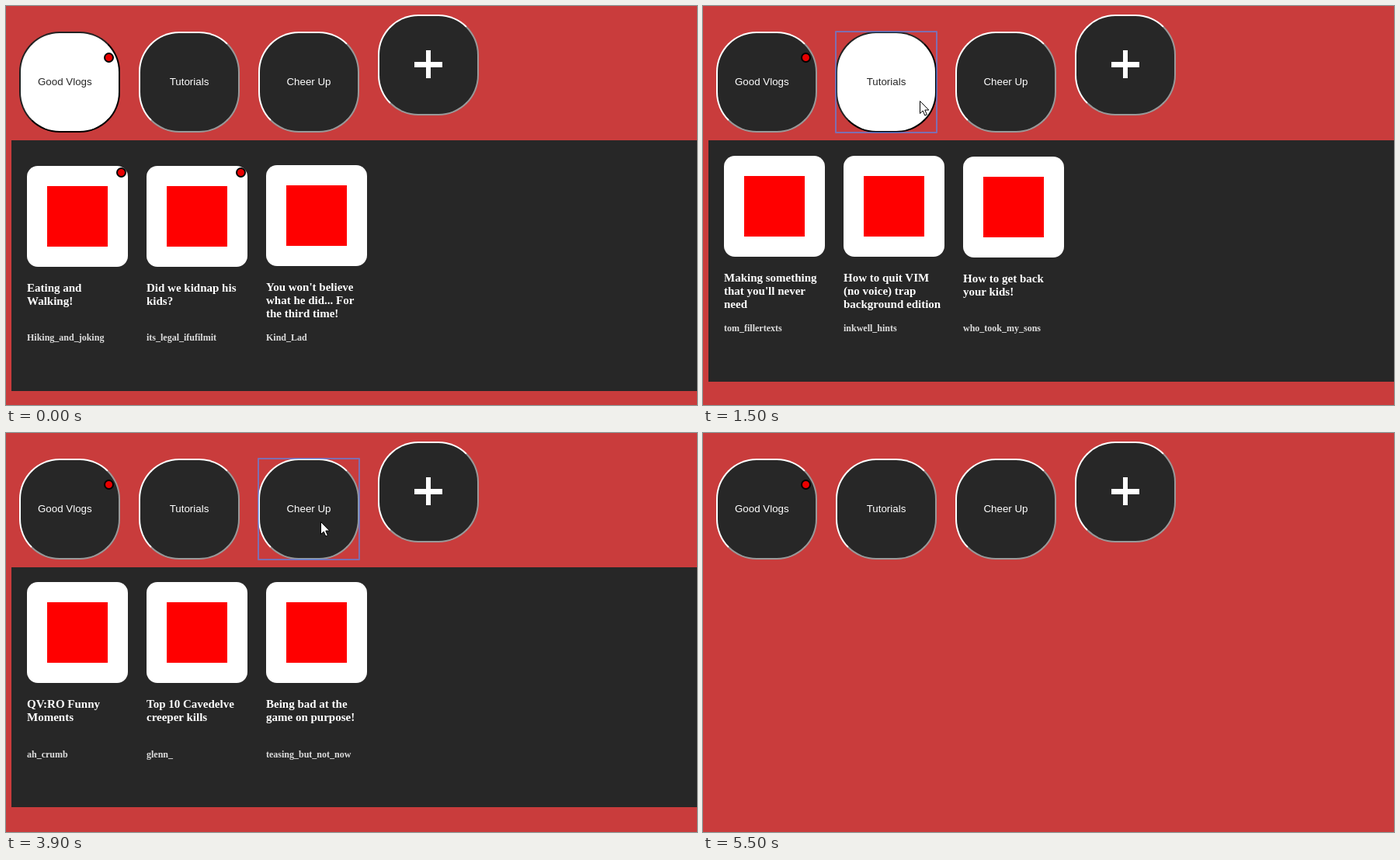
An HTML page that plays this animation: 890 px wide and 514 px high, repeating every 5600 ms.

```html
<!DOCTYPE html>
<html lang="en">
<head>
<meta charset="utf-8">
<title>Subscription groups</title>
<style>
  html, body { margin: 0; width: 100%; height: 100%; overflow: hidden; background: #c93c3c; }
  body * { position: absolute; box-sizing: border-box; }
  .group {
    width: 130px; height: 130px; border: 2px solid; border-radius: 52px;
    border-color: #fff #999 #999 #fff; background: #272727; color: #fff;
    font: 13.333px/15px "Liberation Sans", Arial, sans-serif;
  }
  .group.on { background: #fff; color: #272727; border-color: #222 #000 #000 #222; }
  .group span { left: 0; width: 126px; top: 55px; text-align: center; }
  .group:first-child span { left: 22px; text-align: left; }
  .bar { background: #fff; }
  .dot { width: 13px; height: 13px; border: 2px solid #000; border-radius: 50%; background: #e80000; }
  #ring { top: 32px; width: 132px; height: 132px; border: 2px solid rgba(77, 144, 254, .6); border-radius: 1px; }
  .panel { left: 7px; top: 173px; right: 0; overflow: hidden; background: #272727; }
  .list { left: 0; top: 0; }
  .thumb { width: 130px; height: 130px; border-radius: 14px; background: #fff; }
  .mark { left: 26px; top: 26px; width: 78px; height: 78px; background: #f00; }
  .title, .author { white-space: pre; font: bold 15px/17px "Liberation Serif", "Times New Roman", serif; color: #fff; }
  .author { font-size: 12px; line-height: 14px; color: #ddd; }
  #cursor { left: 0; top: 0; overflow: visible; }
</style>
</head>
<body>
<div id="groups"></div>
<div id="panels"></div>
<div id="ring"></div>
<svg id="cursor" width="13" height="20">
  <path d="M.5 .5V16.5L4.2 13L6.8 19L9.4 17.9L6.8 12H11.8Z" fill="#fff" stroke="#000"/>
</svg>
<script>
const LOOP = 5600, STEP = 100;
const $ = id => document.getElementById(id);

function add(parent, cls, x, y, text = "") {
  const el = document.createElement("div");
  el.className = cls;
  if (x !== undefined) el.style.left = x + "px";
  if (y !== undefined) el.style.top = y + "px";
  el.textContent = text;
  parent.append(el);
  return el;
}

const column = i => 154 * i;

const groups = ["Good Vlogs", "Tutorials", "Cheer Up", ""].map((name, i) => {
  const el = add($("groups"), "group", 17 + column(i), i < 3 ? 33 : 11);
  const label = document.createElement("span");
  label.textContent = name;
  el.append(label);
  return el;
});
add(groups[0], "dot", 107, 25);
for (const [x, y, w, h] of [[45, 59, 36, 7], [60, 44, 6, 36]])
  add(groups[3], "bar", x, y).style.cssText += `;width:${w}px;height:${h}px`;

// Each card: thumbnail top, title, author, unread dot
const data = [
  { height: 323, authorY: 247, cards: [
    [33, "Eating and\nWalking!", "Hiking_and_joking", true],
    [33, "Did we kidnap his\nkids?", "its_legal_ifufilmit", true],
    [32, "You won't believe\nwhat he did... For\nthe third time!", "Kind_Lad"]] },
  { height: 311, authorY: 235, cards: [
    [20, "Making something\nthat you'll never\nneed", "tom_fillertexts"],
    [20, "How to quit VIM\n(no voice) trap\nbackground edition", "inkwell_hints"],
    [21, "How to get back\nyour kids!", "who_took_my_sons"]] },
  { height: 309, authorY: 234, cards: [
    [19, "QV:RO Funny\nMoments", "ah_crumb"],
    [19, "Top 10 Cavedelve\ncreeper kills", "glenn_"],
    [19, "Being bad at the\ngame on purpose!", "teasing_but_not_now"]] }
];

const panels = data.map(({ height, authorY, cards }) => {
  const el = add($("panels"), "panel");
  const list = add(el, "list");
  cards.forEach(([y, title, author, unread], i) => {
    const x = 20 + column(i);
    const thumb = add(list, "thumb", x, y);
    add(thumb, "mark");
    if (unread) add(thumb, "dot", 115, 2);
    add(list, "title", x, y + 149, title);
    add(list, "author", x, authorY, author);
  });
  return { el, list, height };
});
// Panels are sized against the stage, not their wrapper
$("panels").style.cssText = "inset:0";

// Pointer keys: time, x, y
const path = [
  [300, 845, 514], [600, 655, 350], [1000, 437, 187], [1400, 279, 122],
  [1900, 279, 122], [2300, 405, 112], [2800, 405, 112], [2900, 405, 114], [4600, 405, 114]
];

function pointer(t) {
  const i = path.findIndex(key => t < key[0]);
  if (i < 1) return null;
  const [t0, x0, y0] = path[i - 1], [t1, x1, y1] = path[i];
  const p = (t - t0) / (t1 - t0);
  return [x0 + (x1 - x0) * p, y0 + (y1 - y0) * p].map(Math.round);
}

const swing = p => .5 - Math.cos(Math.PI * Math.min(1, Math.max(0, p))) / 2;

function draw(t) {
  const open = t < 1500 ? 0 : t < 3000 ? 1 : 2;
  const selected = t < 3900 ? open : -1;
  groups.forEach((el, i) => el.classList.toggle("on", i === selected));

  const shown = 1 - swing((t - 3950) / 400);
  panels.forEach(({ el, list, height }, i) => {
    el.style.display = i === open && shown > 0 ? "" : "none";
    el.style.height = Math.round(height * shown) + "px";
    list.style.top = Math.round(-9 * (1 - shown)) + "px";
  });

  $("ring").style.display = open && t < 4600 ? "" : "none";
  $("ring").style.left = 16 + column(open) + "px";

  const at = pointer(t);
  $("cursor").style.display = at ? "" : "none";
  if (at) $("cursor").style.transform = `translate(${at[0]}px, ${at[1]}px)`;
}

const start = performance.now();
function frame() {
  const t = (performance.now() - start) % LOOP;
  draw(Math.floor(t / STEP) * STEP);
  requestAnimationFrame(frame);
}
frame();
</script>
</body>
</html>
```
